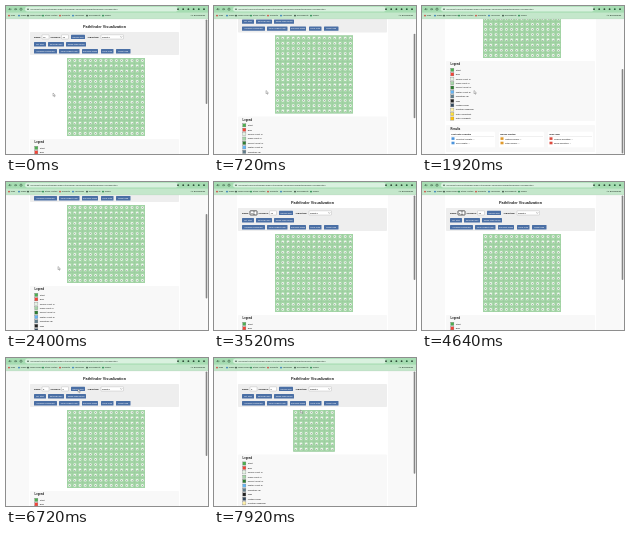
These frames come from a looping animation (202 px wide and 148 px high, 8000 ms). An HTML page:

```html
<!DOCTYPE html>
<html lang="en">
<head>
<meta charset="utf-8">
<style>
html, body { margin: 0; width: 100%; height: 100%; overflow: hidden; background: #fff; }
svg { display: block; width: 100vw; height: 100vh; }
text { font-family: "Liberation Sans", Arial, sans-serif; white-space: pre; }
</style>
</head>
<body>
<svg id="stage" viewBox="0 0 202 148"></svg>
<script>
const LOOP = 8000, VIEW = 135, RESIZE_AT = 6880;
const BLUE = '#4a6fa5', INK = '#111';

const rect = (x, y, w, h, fill, more = '') =>
  `<rect x="${x}" y="${y}" width="${w}" height="${h}" fill="${fill}" ${more}/>`;
const text = (x, y, s, size = 2.3, fill = INK, more = '') =>
  `<text x="${x}" y="${y}" font-size="${size}" fill="${fill}" ${more}>${s}</text>`;
const dot = (x, y, r, fill) => `<circle cx="${x}" cy="${y}" r="${r}" fill="${fill}"/>`;
const bold = 'font-weight="bold"', mid = 'text-anchor="middle"';
const border = 'stroke="#999" stroke-width=".3"';

const button = (x, y, w, label) => rect(x, y, w, 4.4, BLUE, 'rx=".5"') +
  text(x + w / 2, y + 2.95, label, 2.1, '#fff', mid);
const panel = (y, h, fill = '#f8f8f8') => rect(24, y, 149, h, fill, 'rx=".8"');
const field = (id, x) => `<g id="${id}">${rect(x, 28.8, 7, 4.2, '#fff', border + ' rx=".5"')}` +
  text(x + 1, 31.8, '15', 2.3) + '</g>';

function controls() {
  return text(98.5, 22, 'Pathfinder Visualization', 3.8, '#222', bold + ' ' + mid) +
    panel(26, 23, '#eeeeee') +
    text(28, 31.8, 'Rows:', 2.3, INK, bold) + field('rows', 36) +
    text(44.5, 31.8, 'Columns:', 2.2, INK, bold) + field('cols', 55.5) +
    button(65, 28.7, 14, 'Resize Grid') +
    text(81.5, 31.8, 'Algorithm:', 2.3, INK, bold) +
    rect(95, 28.8, 22.5, 4.2, '#fff', border + ' rx=".5"') + text(96, 31.8, 'Dijkstra', 2.3) +
    '<path d="M114.5 30.5l.8.8l.8-.8" fill="none" stroke="#222" stroke-width=".4"/>' +
    [[28, 12, 'Set Start'], [42, 16, 'Set End Point'], [60, 20, 'Toggle Wall Nodes']]
      .map(([x, w, s]) => button(x, 36, w, s)).join('') +
    [[28, 23, 'Visualize Pathfinder'], [53, 20.5, 'Find Longest Path'], [76, 16, 'Generate Maze'],
      [95, 12.5, 'Clear Path'], [110, 14.5, 'Reset Grid']]
      .map(([x, w, s]) => button(x, 43, w, s)).join('');
}

function grid(n) {
  const step = 5.2, left = 100 - n * step / 2;
  let s = rect(left, 52, n * step, n * step, '#94c49a');
  for (let r = 0; r < n; r++) for (let c = 0; c < n; c++) {
    const x = left + c * step, y = 52 + r * step;
    s += rect(x + .1, y + .1, step - .2, step - .2, '#a5d6a7') +
      dot(x + 2.6, y + 2.6, 1.3, '#eef8ee') +
      text(x + 2.6, y + 3.35, '1', 2.2, '#222', mid);
  }
  return s;
}

const legend = [
  ['#4caf50', 'Start'], ['#f44336', 'End'], ['#e3f2e3', 'Grass (Cost 1)'],
  ['#a5d6a7', 'Field (Cost 2)'], ['#2e7d32', 'Forest (Cost 3)'], ['#64b5f6', 'Water (Cost 5)'],
  ['#607d8b', 'Mountain (8)'], ['#222', 'Wall'], ['#34495e', 'Visited Node'],
  ['#fff0a8', 'Frontier (Regular)'], ['#ffe03a', 'Path (Shortest)'], ['#ffc107', 'Path (Longest)']
];
const results = [
  [28, '#4c94dc', 'Last Path Lengths', 'Shortest Length', 'Full Length'],
  [77, '#e09a2c', 'Nodes Visited', 'Visited Nodes', 'Total Nodes'],
  [126, '#dc4c40', 'Time (ms)', 'Search Duration', 'Draw Duration']
];

function details() {
  return panel(133, 60) + text(28.5, 137.4, 'Legend', 2.7, INK, bold) +
    legend.map(([color, label], i) => {
      const y = 140.3 + i * 4.42;
      return rect(28.7, y, 3.2, 3.2, color, 'stroke="#777" stroke-width=".3"') +
        text(33.7, y + 2.4, label, 2.35);
    }).join('') +
    panel(197, 27) + text(28.5, 201.8, 'Results', 2.7, INK, bold) +
    results.map(([x, color, head, ...rows]) =>
      rect(x, 203.8, 45, 15.5, '#fff', 'rx=".6"') + text(x + 1.2, 206.8, head, 2.3, INK, bold) +
      rect(x + 1, 208, 43, .3, '#ccc') +
      rows.map((s, i) => rect(x + 1.5, 209.3 + i * 4.4, 3, 2.6, color) +
        text(x + 6, 211.5 + i * 4.4, s + ': –', 2.25)).join('')).join('');
}

function chrome() {
  let s = rect(0, 0, 202, 13, '#c4e7cb') + rect(0, 0, 202, 6.6, '#a6dcb2') +
    rect(19, .8, 153, 4.8, '#d9f1df', 'rx="2.4"') + rect(0, 12.8, 202, .3, '#b5cdb9');
  s += '<g fill="none" stroke="#1d3a26" stroke-width=".5"><path d="M5.5 3.2h-2.6m1-1l-1 1l1 1M8 3.2h2.6m-1-1l1 1l-1 1"/>' +
    '<circle cx="15" cy="3.2" r="1.1"/></g>' + dot(22, 3.2, .8, '#33483a') +
    text(24.5, 4, 'localhost:5500/pathfinder/index.html?grid=15&amp;mode=weighted&amp;view=visualization', 2.4, '#2b3a30');
  for (let i = 0; i < 6; i++) s += dot(172 + i * 5.2, 3.2, .9, i == 4 ? '#1f6138' : '#2f4a38');
  [[3, 'Mail'], [13, 'Maps'], [22, 'News Feed'], [37, 'Study Notes'], [54, 'Projects'],
    [67, 'Learning'], [81, 'Documents'], [97, 'Music']].forEach(([x, label], i) => {
    s += dot(x, 9.6, .9, ['#d0453b', '#2f7ab8', '#33483a', '#208248'][i % 4]) +
      text(x + 1.8, 10.4, label, 2.3, '#1b2b20');
  });
  return s + text(184.5, 10.4, 'All Bookmarks', 2.3, '#1b2b20');
}

const get = id => document.getElementById(id);
get('stage').innerHTML = rect(0, 0, 202, 148, '#f9f9f9') + rect(23, 13, 151, VIEW, '#fff') +
  `<g id="page">${controls()}<g id="large">${grid(15)}</g><g id="small">${grid(8)}</g>` +
  `<g id="details">${details()}</g></g>` + rect(198.8, 13, 3.2, VIEW, '#fafafa') +
  rect(199.7, 14, 1.6, 85, '#858585', 'rx=".8" id="thumb"') + chrome() +
  '<path id="arrow" d="M0 0v3.2l.8-.7l.6 1.3l.6-.3l-.6-1.2h1z" fill="#fff" stroke="#555" stroke-width=".35"/>' +
  '<path id="beam" d="M-.6-1.5h1.2M0-1.5v3M-.6 1.5h1.2" stroke="#111" stroke-width=".35"/>';

// Tracks are [time, ...values], eased between points.
const scrollTrack = [[0, 0], [480, 0], [900, 37], [1300, 37], [1750, 78], [2080, 78], [2400, 29], [2620, 0]];
const mouseTrack = [[0, 47, 87], [450, 52, 84.5], [2680, 52, 84.5], [3360, 40, 31], [4650, 40, 31],
  [5350, 59.5, 31], [6300, 59.5, 31], [6650, 72, 31], [7150, 72, 31], [7700, 86.5, 52]];

function sample(track, t) {
  const i = track.findIndex(p => p[0] > t);
  if (i < 0) return track[track.length - 1].slice(1);
  const a = track[i - 1], b = track[i], u = (t - a[0]) / (b[0] - a[0]), e = u * u * (3 - 2 * u);
  return a.slice(1).map((v, k) => v + (b[k + 1] - v) * e);
}

function setField(id, value, focused) {
  const box = get(id).firstChild;
  box.setAttribute('stroke', focused ? '#222' : '#999');
  box.setAttribute('stroke-width', focused ? .7 : .3);
  get(id).lastChild.textContent = value;
}

function show(id, on) { get(id).style.display = on ? '' : 'none'; }

function draw(now) {
  const t = now % LOOP, resized = t >= RESIZE_AT;
  const [scroll] = sample(scrollTrack, t), [x, y] = sample(mouseTrack, t);
  const shift = resized ? -36.4 : 0, total = 213 + shift;
  get('page').setAttribute('transform', `translate(0 ${-scroll})`);
  get('details').setAttribute('transform', `translate(0 ${shift})`);
  show('large', !resized);
  show('small', resized);
  get('thumb').setAttribute('y', 13.5 + scroll * VIEW / total);
  get('thumb').setAttribute('height', VIEW * VIEW / total - 1);
  setField('rows', t < 4000 ? '15' : t < 4250 ? '' : '8', t >= 3440 && t < 5450);
  setField('cols', t < 5950 ? '15' : t < 6150 ? '' : '8', t >= 5450 && t < 6700);
  const typing = y < 33 && (x > 36 && x < 43 || x > 55.5 && x < 62.5);
  for (const id of ['arrow', 'beam']) get(id).setAttribute('transform', `translate(${x} ${y})`);
  show('arrow', !typing);
  show('beam', typing);
  requestAnimationFrame(() => draw(performance.now()));
}
draw(0);
</script>
</body>
</html>
```
